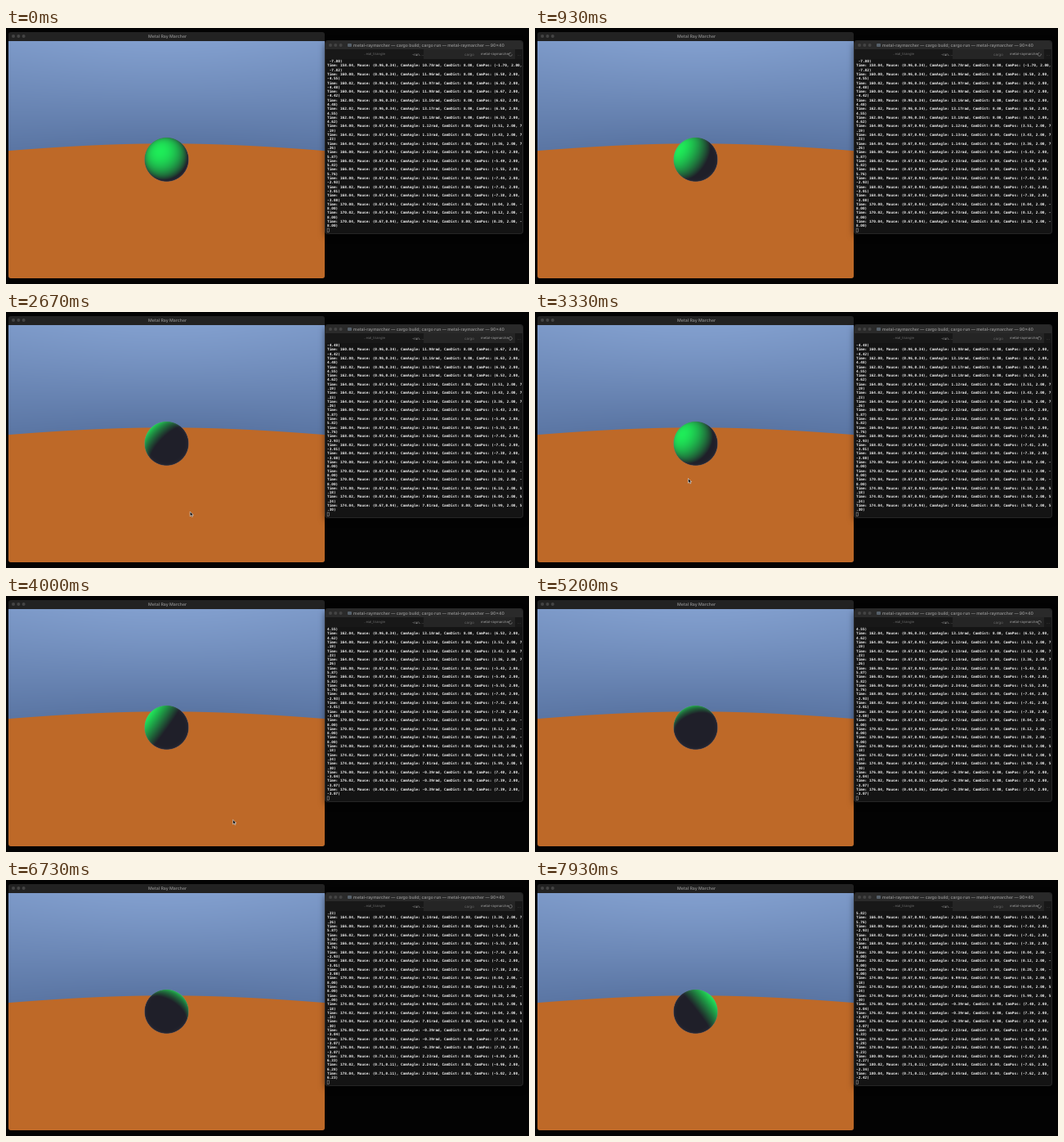
An HTML page with a canvas for the animation above (8 s loop, 640 by 313 pixels).

```html
<!DOCTYPE html>
<html lang="en">
<head>
<meta charset="utf-8">
<title>Metal Ray Marcher</title>
<style>
  html, body { margin: 0; width: 100%; height: 100%; overflow: hidden; background: #030303; }
  body { position: relative; font-family: Inter, "Liberation Sans", sans-serif; }
  div, canvas, svg { position: absolute; }
  .win { box-sizing: border-box; overflow: hidden; border-radius: 3px; }
  #view { left: 3px; top: 5px; width: 387px; height: 301px; background: #222; }
  #scene { left: 0; top: 11px; }
  #term {
    left: 391px; top: 16px; width: 241px; height: 235px;
    background: #141414; box-shadow: 0 0 0 1px #262626, 0 3px 9px #0009;
  }
  #bar { width: 100%; height: 10px; background: #2a2a2a; }
  #tabs { top: 10px; width: 100%; height: 12px; background: #181818; }
  #active { left: 120px; width: 112px; height: 100%; background: #252525; }
  .dots { top: 3.3px; left: 4px; width: 4px; height: 4px; border-radius: 50%;
    background: #444; box-shadow: 6.3px 0 #444, 12.6px 0 #444; }
  .folder { left: 27px; top: 3px; width: 4.6px; height: 4.2px; border-radius: 1px; background: #56606a; }
  /* small type is laid out at ten times its size, then scaled */
  .t { transform: scale(.1); transform-origin: 0 0; white-space: pre; text-rendering: geometricPrecision; }
  .label { font-size: 50px; line-height: 60px; color: #6c6c6c; }
  #log { left: 1.8px; top: 22.3px; font: bold 44px/52.95px "DejaVu Sans Mono", monospace; color: #f2f2f2; }
  #overlay { left: 0; top: 0; }
</style>
</head>
<body>
<div id="view" class="win">
  <div class="dots"></div>
  <div class="t label" style="left:170.8px;top:2.1px;font-size:52px;font-weight:600;color:#868686">Metal Ray Marcher</div>
  <canvas id="scene" width="387" height="290"></canvas>
</div>
<div id="term" class="win">
  <div id="bar">
    <div class="dots"></div>
    <div class="folder"></div>
    <div class="t label" style="left:34px;top:2.2px;font-size:51.5px;font-weight:600;color:#8e8e8e">metal-raymarcher — cargo build; cargo run — metal-raymarcher — 90×40</div>
  </div>
  <div id="tabs">
    <div id="active"></div>
    <div class="t label" style="left:47px;top:3px;font-size:42px">..eial_triangle</div>
    <div class="t label" style="left:105.5px;top:3px;font-size:44px;color:#aaa">-run.…</div>
    <div class="t label" style="left:170px;top:3px;font-size:44px">cargo</div>
    <div class="t label" style="left:190px;top:3px;font-size:42px;color:#a5a5a5">metal-raymarcher</div>
    <div class="t label" style="left:235px;top:3px;font-size:46px">…</div>
  </div>
  <div id="log" class="t"></div>
</div>
<svg id="overlay" width="640" height="313">
  <rect x="393.1" y="245" width="2.4" height="4.6" fill="none" stroke="#9a9a9a" stroke-width=".6"/>
  <circle id="spin" cx="617.3" cy="32.3" r="2" fill="none" stroke="#808080" stroke-width=".7" stroke-dasharray="9.4 3.2"/>
  <path id="mouse" d="M0 0V5.6L1.4 4.4 2.3 6.4 3.3 6 2.4 4H4.1Z" fill="#080808" stroke="#eee" stroke-width=".6"/>
</svg>
<script>
const LOOP = 8000;
const W = 387, H = 290, FOCAL = 218, TILT = Math.atan2(2, 8);
const SIN = Math.sin(TILT), COS = Math.cos(TILT);
const BALL = { x: 193.5, y: 144.8, r: 27 };
const $ = id => document.getElementById(id);
const ctx = $('scene').getContext('2d');
const mix = (a, b, t) => a.map((v, i) => v + (b[i] - v) * t);

// Log: three lines every two seconds. [time, mouse x, mouse y, camera angle]
const groups = [
  [158, .96, .34, 10.7615], [160, .96, .34, 11.9615], [162, .96, .34, 13.1612],
  [164, .67, .94, 1.1172], [166, .67, .94, 2.3172], [168, .67, .94, 3.5171],
  [170, .67, .94, 4.7171], [174, .67, .94, 6.9873], [176, .44, .36, -.3898],
  [178, .71, .11, 2.2289], [180, .71, .11, 3.4289]
];
const COLS = 90, ROWS = 39;

function logRows(count) {
  const rows = [], f = v => v.toFixed(2);
  for (const [time, mx, my, angle] of groups.slice(0, count)) {
    for (let k = 0; k < 3; k++) {
      const a = angle + (angle < 0 ? -.0042 * Math.min(k, 1) : .0101 * k);
      const line = `Time: ${f(time + k * .02)}, Mouse: (${f(mx)},${f(my)}), CamAngle: ${f(a)}rad, ` +
        `CamDist: 8.00, CamPos: (${f(8 * Math.cos(a))}, 2.00, ${f(8 * Math.sin(a))})`;
      rows.push(line.slice(0, COLS), line.slice(COLS));
    }
  }
  return rows.slice(-ROWS).join('\n');
}

// Pointer path: [ms, x, y], eased between stops
const path = [[2200, 232, 308], [2950, 222, 214], [3120, 220, 212], [3330, 187.5, 203.5],
  [3490, 172.2, 201.2], [3720, 172.2, 201.2], [4000, 277.7, 273.5], [4041, 277.7, 273.5]];
const DRAG = 3060, RELEASE = 4041, LAG = 90;

function pointer(ms) {
  const i = path.findIndex(p => p[0] > ms);
  if (i < 1) return null;
  const [t0, x0, y0] = path[i - 1], [t1, x1, y1] = path[i];
  const u = (ms - t0) / (t1 - t0), e = u * u * (3 - 2 * u);
  return { x: x0 + (x1 - x0) * e, y: y0 + (y1 - y0) * e };
}

// Free orbit at 0.6 rad/s; while dragged the pointer sets the angle, a little late
function camAngle(ms) {
  const turn = .0006;
  if (ms < 600) return 5.86 + turn * ms;
  if (ms < DRAG) return 7.01 + turn * (ms - 1600);
  if (ms < RELEASE) return ((pointer(ms - LAG).x - 3) / W - .5) * 2 * Math.PI;
  return 2.2491 + turn * (ms - 5590);
}

// The floor ends at a fixed distance, so its edge bows
const horizon = x => 125.3 + .12 * (Math.hypot(x, FOCAL) - FOCAL);

function makeBackdrop() {
  const low = [90, 117, 163], high = [130, 159, 206], floor = [190, 105, 40];
  const img = ctx.createImageData(W, H);
  for (let j = 0; j < H; j++) {
    for (let i = 0; i < W; i++) {
      const x = i + .5 - W / 2, y = BALL.y - j - .5;
      const up = (y * COS - FOCAL * SIN) / Math.hypot(x, y, FOCAL);
      const cover = Math.min(1, Math.max(0, j + 1 - horizon(x)));
      const sky = mix(low, high, (up + .15) / .485);
      img.data.set([...mix(sky, floor, cover), 255], (j * W + i) * 4);
    }
  }
  const c = document.createElement('canvas');
  c.width = W; c.height = H;
  c.getContext('2d').putImageData(img, 0, 0);
  return c;
}

const backdrop = makeBackdrop();
const SIZE = 58;
const ball = document.createElement('canvas');
ball.width = ball.height = SIZE;
const ballCtx = ball.getContext('2d');
const pixels = ballCtx.createImageData(SIZE, SIZE);
const DARK = [31, 31, 41], LIT = [30, 236, 88], RIM = [128, 138, 165];

function drawBall(angle) {
  const o = angle + Math.PI / 4, s = Math.sqrt(1 / 3), h = Math.sqrt(2 / 3);
  const side = -h * Math.sin(o), depth = h * Math.cos(o);
  const ly = s * COS - depth * SIN, lz = s * SIN + depth * COS;
  const left = Math.floor(BALL.x - SIZE / 2), top = Math.floor(BALL.y - SIZE / 2);
  for (let j = 0; j < SIZE; j++) {
    for (let i = 0; i < SIZE; i++) {
      const dx = (left + i + .5 - BALL.x) / BALL.r, dy = (BALL.y - top - j - .5) / BALL.r;
      const d = Math.hypot(dx, dy), k = d > 1 ? 1 / d : 1;
      const nx = dx * k, ny = dy * k, nz = Math.sqrt(Math.max(0, 1 - nx * nx - ny * ny));
      const light = Math.max(0, nx * side + ny * ly + nz * lz);
      const color = mix(mix(DARK, LIT, light), RIM, .5 * (1 - nz) ** 6);
      const alpha = Math.min(1, Math.max(0, (1 - d) * BALL.r + .5));
      pixels.data.set([...color, 255 * alpha], (j * SIZE + i) * 4);
    }
  }
  ballCtx.putImageData(pixels, 0, 0);
  ctx.drawImage(ball, left, top);
}

let shown = 0;
function render(t) {
  // 15 steps a second, with a stall after the first
  let step = Math.floor((t + 5) * .015);
  if (step > 0 && step < 10) step = 1;
  const ms = step / .015;

  ctx.drawImage(backdrop, 0, 0);
  drawBall(camAngle(ms));

  const count = 7 + Math.floor((ms + 400.5) / 2000);
  if (count !== shown) {
    $('log').textContent = logRows(count);
    shown = count;
  }

  const p = pointer(ms);
  $('mouse').setAttribute('visibility', p ? 'visible' : 'hidden');
  if (p) $('mouse').setAttribute('transform', `translate(${p.x} ${p.y})`);
  $('spin').setAttribute('transform', `rotate(${ms * .36} 617.3 32.3)`);
}

function tick() {
  render(performance.now() % LOOP);
  requestAnimationFrame(tick);
}
tick();
</script>
</body>
</html>
```
